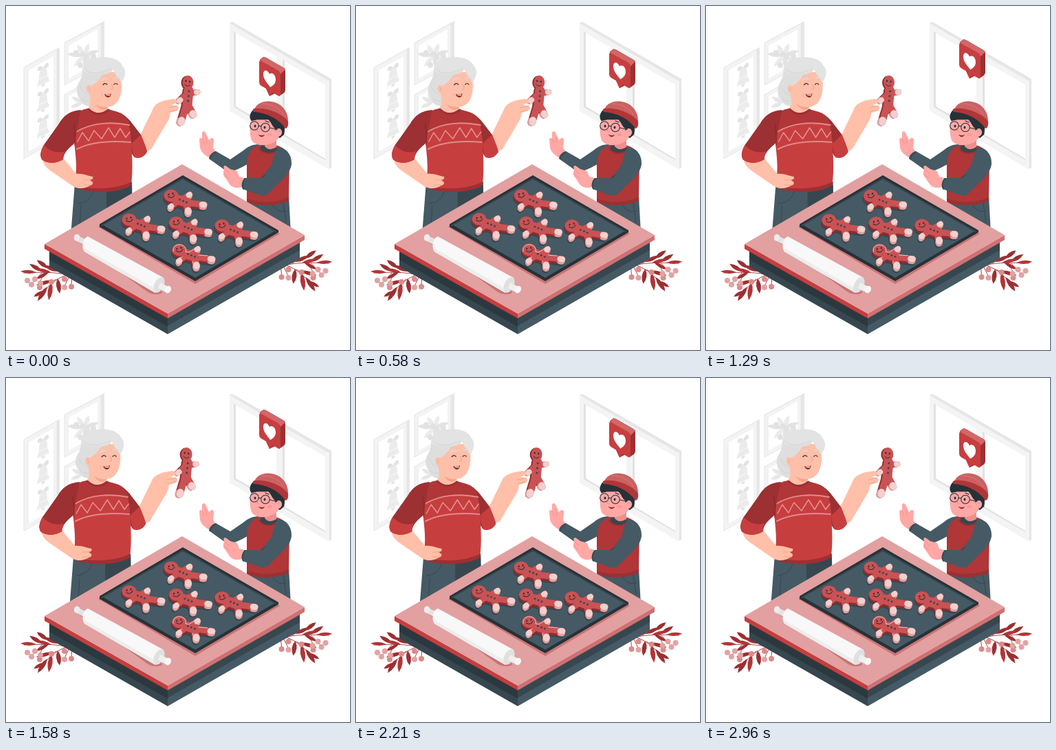
An HTML page with a canvas for the animation above (3 s loop, 500 by 500 pixels).

```html
<!DOCTYPE html>
<html lang="en">
<head>
<meta charset="utf-8">
<title>Baking gingerbread</title>
<style>
html, body { margin: 0; width: 100%; height: 100%; overflow: hidden; background: #fff; }
canvas { display: block; width: 500px; height: 500px; }
</style>
</head>
<body>
<canvas id="stage"></canvas>
<script>
const canvas = document.getElementById('stage');
const c = canvas.getContext('2d');
const dpr = window.devicePixelRatio || 1;
canvas.width = canvas.height = 500 * dpr;

const RED = '#c73e3f', DEEP = '#9c3032', WINE = '#b03638', ROSE = '#e2a0a0';
const SLATE = '#455a64', DARK = '#37474f', INK = '#263238';
const SKIN = '#ffbfa8', SKIN2 = '#f2a58d', PINK = '#ffa8a6', PINK2 = '#ee8f8d';
const DOUGH = '#ca5254', PALE = '#f2d0ce';

const paths = {};
const path = d => paths[d] || (paths[d] = new Path2D(d));

function fill(d, color) {
  c.fillStyle = color;
  c.fill(path(d));
}
function line(d, color, width = 1) {
  c.strokeStyle = color;
  c.lineWidth = width;
  c.stroke(path(d));
}
function oval(x, y, rx, ry, color, tilt = 0) {
  c.beginPath();
  c.ellipse(x, y, rx, ry, tilt, 0, 7);
  c.fillStyle = color;
  c.fill();
}
function at(x, y, draw) {
  c.save();
  c.translate(x, y);
  draw();
  c.restore();
}
// Linear keyframes spread evenly over one period
function track(keys, period, t) {
  const p = (t % period) / period * (keys.length - 1);
  const i = Math.floor(p);
  return keys[i] + (keys[i + 1] - keys[i]) * (p - i);
}

function bell(x, y) {
  c.save();
  c.translate(x, y);
  c.transform(1, -0.45, 0, 1, 0, 0);
  fill('M0-11C5-11 6-5 6 1C6 6 9 8 9 12H-9C-9 8-6 6-6 1C-6-5-5-11 0-11Z', '#ebebeb');
  fill('M0-11C-3-18-9-17-8-11C-7-8-3-9 0-11C3-9 7-8 8-11C9-17 3-18 0-11Z', '#e3e3e3');
  oval(0, 13.5, 2.6, 2.6, '#e3e3e3');
  line('M-9 12H9M-6 3H6', '#f6f6f6', 1.2);
  c.restore();
}
function leaf(x, y, deg, len, wide, color) {
  c.save();
  c.translate(x, y);
  c.rotate(deg * Math.PI / 180);
  c.beginPath();
  c.moveTo(0, 0);
  c.quadraticCurveTo(len * 0.5, -wide, len, 0);
  c.quadraticCurveTo(len * 0.5, wide, 0, 0);
  c.fillStyle = color;
  c.fill();
  c.restore();
}
function wall() {
  fill('M26 90L30 87L78 60V192L74 195L26 222Z', '#f3f3f3');
  fill('M74 63L78 60V192L74 195ZM26 90L30 87L78 60L74 63Z', '#e6e6e6');
  fill('M32 94L69 73V191L32 212Z', '#fff');
  line('M26 90V222L74 195V63ZM32 94V212', '#e6e6e6', 1);
  [101, 138, 176].forEach(y => bell(54, y));

  fill('M85 54L89 51L143 22V83L85 115Z', '#f3f3f3');
  fill('M138 26L143 22V83L138 86ZM85 54L89 51L143 22L138 26Z', '#e6e6e6');
  fill('M90 58L133 34V82L90 106Z', '#fff');
  line('M85 54V115L138 86V26ZM90 58V106', '#e6e6e6', 1);
  for (let i = 0; i < 7; i++) leaf(114, 72, i * 51 - 70, 19 + i % 3 * 3, 7, i % 2 ? '#e3e3e3' : '#ebebeb');
  [[102, 68], [108, 86], [127, 73], [112, 70], [117, 75]].forEach(p => oval(p[0], p[1], 4, 4, '#e2e2e2'));

  fill('M85 129L130 103V152L85 179Z', '#f3f3f3');
  fill('M90 132L126 112V150L90 170Z', '#fff');
  line('M85 129V179L125 156M85 129L125 106M90 132V170', '#e6e6e6', 1);
  [-150, -110, -60, 160].forEach(a => leaf(111, 141, a, 18, 6, '#e6e6e6'));

  fill('M325 25L329 23L473 106V235L469 237L325 152Z', '#e6e6e6');
  fill('M325 25L469 109V237L325 152Z', '#f4f4f4');
  fill('M331 37L393 73V183L331 147ZM402 78L464 114V224L402 188Z', '#e2e2e2');
  fill('M334 39L393 73V180L334 146ZM405 80L464 114V222L405 187Z', '#fff');
  line('M469 109V237', '#fff', 0.8);
}

function sprig() {
  line('M100 394C84 388 66 386 26 388M88 391C72 396 60 408 47 424M80 388C68 382 58 378 47 373M92 393L85 407M96 394L95 405M73 397L66 402M52 388L37 404M56 388L48 403', DEEP, 0.9);
  const leaves = [[44, 387, 183, 23, 5], [53, 386, 211, 22, 6], [61, 381, 216, 20, 6], [65, 387, 193, 22, 5],
    [75, 386, 205, 22, 5.5], [63, 386, 150, 22, 5], [88, 388, 202, 22, 5], [68, 399, 165, 25, 5.5], [60, 408, 124, 25, 6.5],
    [66, 401, 98, 27, 7], [75, 396, 82, 22, 7], [55, 414, 150, 17, 5]];
  leaves.forEach((l, i) => leaf(...l, i % 3 ? DEEP : WINE));
  [[37, 405], [49, 409], [50, 403], [66, 401], [85, 409], [95, 408], [31, 399], [85, 397], [42, 397]]
    .forEach((b, i) => oval(b[0], b[1], 4, 4, i % 2 ? '#dc8a8a' : '#e3a2a2'));
}
function plants() {
  sprig();
  c.save();
  c.transform(-1, 0, 0, 1, 495.5, -14);
  sprig();
  c.restore();
}

// Limbs are x1, y1, x2, y2, width
const flat = {
  head: [11, 9.5, 10.5, 9], depth: [-0.5, 3], eyes: [[7.5, 8], [13.5, 6.5]], smile: 'M6.5 11Q13 15 16 8.5',
  body: [[21, 15.5, 35, 20, 14]],
  limbs: [[26, 15, 38, 8, 8], [21, 18, 10, 26, 8], [36, 20, 59, 23, 9], [33, 21, 36, 33, 10]],
  dots: [[23.5, 15.5], [28.5, 17.5], [33.5, 19.5]]
};
const upright = {
  head: [264.5, 111, 8, 10], depth: [-2, 0.5], eyes: [[261.5, 109], [267, 110]], smile: 'M260 114Q263.5 118.5 267.5 115',
  body: [[265.5, 123, 263.5, 144, 14]],
  limbs: [[267, 127, 278.5, 125, 8], [263, 127, 252, 138, 8], [265, 144, 272.5, 158, 10], [262, 144, 254.5, 169, 10]],
  dots: [[266, 124], [265.3, 131], [264.6, 138]]
};
function stroke(l, from, color) {
  const [x1, y1, x2, y2, w] = l;
  c.beginPath();
  c.moveTo(x1 + (x2 - x1) * from, y1 + (y2 - y1) * from);
  c.lineTo(x2, y2);
  c.strokeStyle = color;
  c.lineWidth = w;
  c.stroke();
}
function layer(p, dough, icing) {
  oval(...p.head, dough);
  p.body.concat(p.limbs).forEach(l => stroke(l, 0, dough));
  p.limbs.forEach(l => stroke(l, 0.88, icing));
}
function cookie(p, iced) {
  at(...p.depth, () => layer(p, '#8f2c2e', '#d9a4a2'));
  layer(p, DOUGH, PALE);
  p.dots.forEach(d => oval(d[0], d[1], 1.5, 1.4, DARK));
  p.eyes.forEach(d => oval(d[0], d[1], 1.1, 1.4, INK));
  line(p.smile, INK, 1);
  if (iced) line('M2 12C1 3 9 0 16 3Q22 7 20 12L25 13L33 8M15 20L10 22M39 17L52 18M31 26L30 29', PALE, 0.9);
}

function woman() {
  // jeans
  fill('M100 258L183 256L184 300L94 335Z', SLATE);
  fill('M146 268L183 260L183 276L146 296Z', DARK);
  line('M104 287C115 287 124 280 127 268M109 290L107 320', DARK, 1);

  cookie(upright);

  // raised arm
  fill('M194 190L213 151C215 143 224 139 232 137L244 135Q249 136 249 140L241 144L249 145Q253 148 249 152L239 155C238 162 236 167 233 171L211 208Q202 215 195 204Z', SKIN);
  line('M249 145L236 148M248 151L237 154', SKIN2, 1);
  fill('M157 153C173 156 180 166 186 174L196 187C200 197 204 206 205 212C200 220 194 222 187 220C178 211 177 190 173 176Z', DEEP);
  fill('M196 187C200 197 204 206 205 212C200 220 194 222 187 220C184 214 183 206 182 200Z', RED);

  // neck
  fill('M121 132H148V155Q133 165 120 153Z', SKIN);
  fill('M130 143Q139 148 148 146V148Q140 156 130 143Z', SKIN2);

  // sweater
  fill('M120 149C107 151 99 157 98 174C98 198 102 215 102 235L101 262C120 272 160 273 182 259C185 238 183 215 182 196C181 174 175 158 162 154L148 150Q134 162 120 149Z', RED);
  fill('M120 149C106 151 98 157 98 176L101 183C125 168 154 167 179 172C176 161 170 156 162 154L148 150Q134 162 120 149Z', WINE);
  fill('M101 260C123 268 161 267 183 255L182 261C162 273 122 273 101 264Z', DEEP);
  line('M120 150Q134 163 149 151', DEEP, 3);
  line('M102 183C125 169 154 168 179 173M103 208C125 197 157 196 181 198', '#e08a8a', 2);
  line('M104 197L111 184L120 196L128 181L139 193L149 177L158 191L166 178L174 191L180 183', '#e29292', 1.5);

  // arm on the hip
  fill('M53 222L82 220L102 244C111 243 119 247 126 248Q128 252 122 253L126 256Q127 260 122 261C115 266 106 266 99 263L64 239Q54 232 53 222Z', SKIN);
  line('M122 253L113 253M123 260L113 260', SKIN2, 1);
  fill('M109 151C93 152 83 160 77 171L55 202C50 211 49 217 52 223C61 230 74 229 83 223C84 211 94 205 100 199C103 181 105 166 109 151Z', DEEP);
  fill('M55 202C50 211 49 217 52 223C61 230 74 229 83 223C83 218 84 214 86 211C74 215 63 211 55 202Z', RED);
  line('M100 202C102 190 99 180 99 172', '#842729', 1);

  // head
  fill('M120 96H164C169 106 169 119 167 127C165 138 158 147 146 147C134 147 124 141 119 128Z', SKIN);
  fill('M136 75C123 74 111 82 111 94C111 102 108 108 105 113C101 121 103 130 108 134C108 142 116 146 122 145C124 138 121 129 120 117C129 115 135 108 140 100C148 99 153 97 156 92C159 101 164 104 167 111C174 104 175 92 169 87C166 79 153 73 136 75Z', '#dedede');
  fill('M136 75C123 74 111 82 111 94C122 103 143 99 156 92C159 101 164 104 167 111C174 104 175 92 169 87C166 79 153 73 136 75Z', '#e3e3e3');
  line('M115 92C123 101 138 98 153 91M108 117C111 125 116 129 121 129M108 133C113 138 117 139 122 138', '#cecece', 0.8);
  oval(121, 121, 4, 6, SKIN, -0.2);
  line('M120 118Q123 120 121 124', SKIN2, 0.8);
  line('M141 114.5Q144 111 147 114M157 114Q159.5 111 162 114', INK, 1.2);
  line('M139 108Q143 104 147 106M158 105Q162 103 165 106', '#dcd8d5', 2);
  line('M153 114Q158 121 152 121', SKIN2, 1.2);
  line('M139 127Q141 129 140 132', SKIN2, 0.8);
  fill('M143 128Q148 130 153 127Q152 133 148 133Q144 132 143 128Z', '#8f2c2e');
  fill('M144.5 128.8Q148 130 152 128.2L151 130Q147 131 144.5 128.8Z', '#fff');
}

function boy() {
  fill('M351 278L411 276L414 330L351 320Z', SLATE);
  line('M403 286L407 314M388 289C391 297 399 300 407 298', DARK, 1);

  // waving arm
  fill('M297 221C290 218 284 213 282 206L281 194Q282 190 285 193L285 184Q287 180 290 184L295 195L298 192Q302 191 302 196L301 206L306 214Z', PINK);
  line('M285 193L288 200M290 192L292 199', PINK2, 0.9);
  fill('M368 201C357 201 351 205 345 210L326 223L305 211C299 213 295 217 295 222L319 239C328 242 336 238 347 232L364 224Z', SLATE);
  line('M305 212Q299 215 297 222', DARK, 1.5);

  // vest
  fill('M368 202C357 206 351 213 350 231V284C366 292 397 290 411 282L412 225C411 211 402 204 391 202Z', WINE);
  fill('M350 280C369 287 394 286 411 278V283C396 291 366 292 350 285Z', DEEP);
  fill('M371 200H392L394 209C388 216 375 215 369 209Z', DARK);
  line('M368 207C374 216 389 217 396 207', DEEP, 2);

  // near arm
  fill('M347 250L339 248L336 240L326 237L319 232Q315 232 317 237L316 242Q315 246 319 250L325 259C330 265 337 265 344 263Z', PINK);
  line('M318 238L325 244M317 244L324 250', PINK2, 0.9);
  fill('M397 205C408 207 416 217 415 230C414 237 410 244 405 249L382 272C378 277 372 276 366 274L344 266C341 261 343 254 347 250L371 250L386 231C389 220 389 211 397 205Z', SLATE);
  line('M347 251Q342 258 345 266M371 250L376 246', DARK, 1.5);

  // head
  fill('M377 192H393V205Q383 212 376 204Z', PINK2);
  fill('M358 162C353 172 354 187 357 195C361 202 374 204 382 201C391 199 397 193 399 186L396 164Z', PINK);
  fill('M358 152C354 157 353 163 357 167C365 164 372 166 381 165C386 169 386 174 391 178L393 188L398 192L404 187C407 177 404 162 397 154Z', INK);
  oval(396, 184, 5, 6, PINK, 0.2);
  line('M394 183Q397 180 399 183', PINK2, 1);
  fill('M361 152C362 143 373 137 386 139C401 141 411 154 410 169L407 177C397 163 377 155 361 152Z', '#cb6162');
  fill('M361 149C379 147 402 156 410 168C411 173 409 178 406 178C397 164 379 155 360 154C358 152 358 150 361 149Z', WINE);
  line('M371 142C385 141 399 149 403 158', '#d67a7a', 1);
  oval(362, 174.5, 1.5, 2, INK);
  oval(376, 176.5, 1.5, 2, INK);
  line('M357 166L363 165M377 167L382 169', INK, 1.3);
  c.lineWidth = 1.1;
  c.strokeStyle = INK;
  [[361, 174], [377, 176.5]].forEach(p => {
    c.beginPath();
    c.arc(p[0], p[1], 6.3, 0, 7);
    c.stroke();
  });
  line('M367 174.5H370.7M383.3 177L394 179.5', INK, 1);
  line('M367 177Q363 183 368 183', PINK2, 1.2);
  fill('M366 186.5Q371 189 376 187Q374 191 370 190Z', '#8f2c2e');
  oval(383, 187, 3.5, 2.3, '#ff9896');
}

function table() {
  fill('M63 350L235 448V477L63 379Z', DARK);
  fill('M63 350L235 448V466L63 369Z', '#2b393f');
  fill('M427 338L235 448V477L427 367Z', SLATE);
  fill('M427 338L235 448V465L427 355Z', DARK);
  fill('M56 346L235 447V454L56 353Z', RED);
  fill('M434 333L235 447V454L434 340Z', '#d07072');
  fill('M56 346L256 230L434 333L235 447Z', ROSE);

  // tray
  fill('M134 321L257 249L398 331L275 404Z', '#c97475');
  fill('M136 317L257 246L396 326V329L275 400L136 321Z', INK);
  fill('M140 318L257 250L391 327L275 395Z', SLATE);
  line('M139 319L257 251L392 328', DARK, 2);

  // rolling pin
  fill('M100 340L114 349L205 415C211 420 222 420 227 417L222 405L112 345Z', '#c97475');
  fill('M101 332C98 334 99 340 103 342L115 348L119 341Z', '#e4e4e4');
  oval(103, 336.5, 4, 5, '#ededed', 0.4);
  fill('M119 335L229 395L217 417L114 357C109 350 112 337 119 335Z', '#f8f8f8');
  fill('M112 351L219 412L217 417L114 357Z', '#ededed');
  oval(222.5, 405.5, 7, 12, '#e0e0e0', 0.45);
  fill('M224 402L236 408L234 417L221 410Z', '#efefef');
  oval(235.5, 412, 4.3, 5.5, '#f7f7f7', 0.4);
}

const spots = [[229, 266], [168, 301], [236.5, 305.5], [303, 309.5], [241, 345]];
function cookies(deg) {
  c.save();
  c.translate(268, 326);
  c.rotate(deg * Math.PI / 180);
  c.translate(-268, -326);
  spots.forEach((s, i) => at(s[0], s[1], () => {
    at(-1.5, 5, () => layer(flat, DARK, DARK));
    cookie(flat, i === 4);
  }));
  c.restore();
}

function badge() {
  fill('M369 78L374 74Q376 74 378 75L404 90Q406 92 406 95V122Q406 125 403 127L397 131L391 127L383 131L378 120Z', DEEP);
  fill('M369 79L374 74Q376 74 378 75L404 90Q406 91 406 92L399 99Z', '#d46668');
  fill('M368 82Q368 78 371 80L396 94Q399 96 399 100V127Q399 132 395 130L388 126L383 131L378 120L371 116Q368 114 368 111Z', RED);
  fill('M383 99C380 92 374 92 374 99C374 107 380 112 384 118C388 116 392 113 392 107C392 99 386 96 383 99Z', '#fff');
}

const start = performance.now();
function frame() {
  const t = Math.max(0, performance.now() - start) % 3000;
  c.setTransform(dpr, 0, 0, dpr, 0, 0);
  c.fillStyle = '#fff';
  c.fillRect(0, 0, 500, 500);
  c.lineCap = c.lineJoin = 'round';
  wall();
  plants();
  at(track([0, -1, 2, -4, 4, -4, 4, -4, 2, -1, 0], 3000, t), 0, woman);
  boy();
  table();
  cookies(track([0, 1, 0, -1, 0], 1500, t));
  at(0, track([0, -29.5, 0], 3000, t), badge);
  requestAnimationFrame(frame);
}
frame();
</script>
</body>
</html>
```
